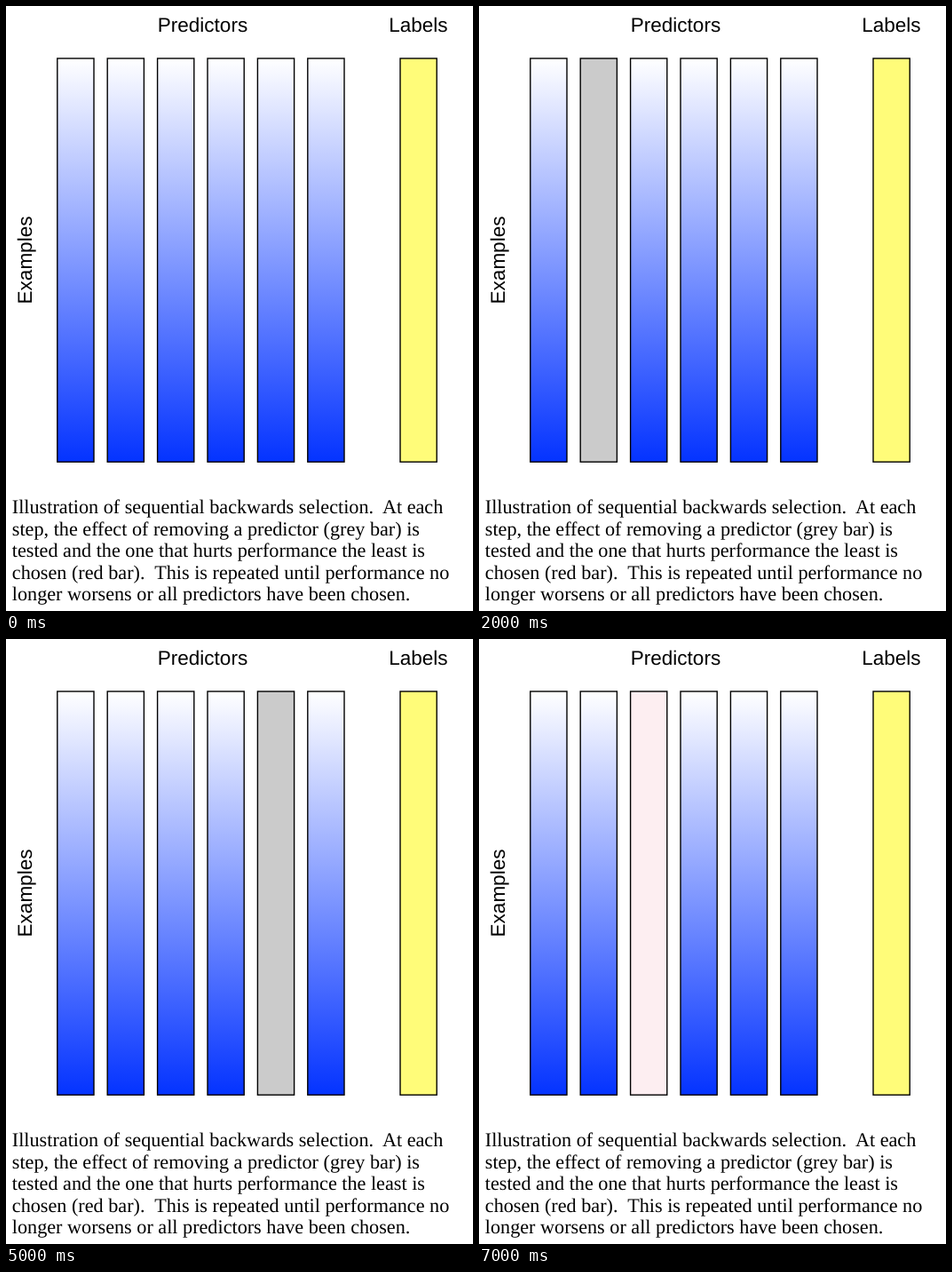
Recreate the animation shown at these times as an HTML page. Size 526 px wide and 681 px high, loop 8000 ms.

```html
<!DOCTYPE html>
<html lang="en">
<head>
<meta charset="utf-8">
<title>Sequential backwards selection</title>
<style>
  html, body { margin: 0; width: 100%; height: 100%; overflow: hidden; background: #fff; }
  svg { display: block; width: 526px; height: 681px; }
  text { text-rendering: geometricPrecision; white-space: pre; fill: #000; }
  .head { font: 22.5px "Liberation Sans", Arial, sans-serif; text-anchor: middle; }
  .note { font: 22.2px "Liberation Serif", "Times New Roman", serif; }
  rect { stroke: #000; stroke-width: 1.4; }
</style>
</head>
<body>
<svg id="stage" viewBox="0 0 526 681">
  <defs>
    <linearGradient id="blue" x1="0" y1="0" x2="0" y2="1">
      <stop offset="0" stop-color="#fff"/>
      <stop offset="1" stop-color="#0433ff"/>
    </linearGradient>
  </defs>
  <text class="head" x="221.5" y="29">Predictors</text>
  <text class="head" x="464.3" y="29">Labels</text>
  <text class="head" transform="translate(29 286) rotate(-90)">Examples</text>
</svg>
<script>
  const stage = document.getElementById("stage");
  const STEP = 1000, LOOP = 8000;
  const BLUE = "url(#blue)", GREY = "#cbcbcb", RED = "#fdeef1", YELLOW = "#fffc79";
  const COUNT = 6, CHOSEN = 2;

  function add(tag, attrs, text = "") {
    const node = document.createElementNS("http://www.w3.org/2000/svg", tag);
    for (const key in attrs) node.setAttribute(key, attrs[key]);
    node.textContent = text;
    return stage.appendChild(node);
  }

  const addBar = (x, fill) => add("rect", { x, y: 59, width: 41.2, height: 454.2, fill });

  const bars = Array.from({ length: COUNT }, (_, i) => addBar(57.8 + i * 56.4, BLUE));
  addBar(444, YELLOW);

  [
    "Illustration of sequential backwards selection.\u00a0 At each",
    "step, the effect of removing a predictor (grey bar) is",
    "tested and the one that hurts performance the least is",
    "chosen (red bar).\u00a0 This is repeated until performance no",
    "longer worsens or all predictors have been chosen."
  ].forEach((line, i) => add("text", { class: "note", x: 6.8, y: 571 + i * 24.6 }, line));

  // Rest, test each predictor in turn, then show the chosen one.
  function draw(ms) {
    const step = Math.floor((ms % LOOP) / STEP);
    bars.forEach((bar, i) => {
      let fill = BLUE;
      if (step === i + 1) fill = GREY;
      else if (step > COUNT && i === CHOSEN) fill = RED;
      bar.setAttribute("fill", fill);
    });
  }

  const start = performance.now();
  function tick() {
    draw(performance.now() - start);
    requestAnimationFrame(tick);
  }
  tick();
</script>
</body>
</html>
```
